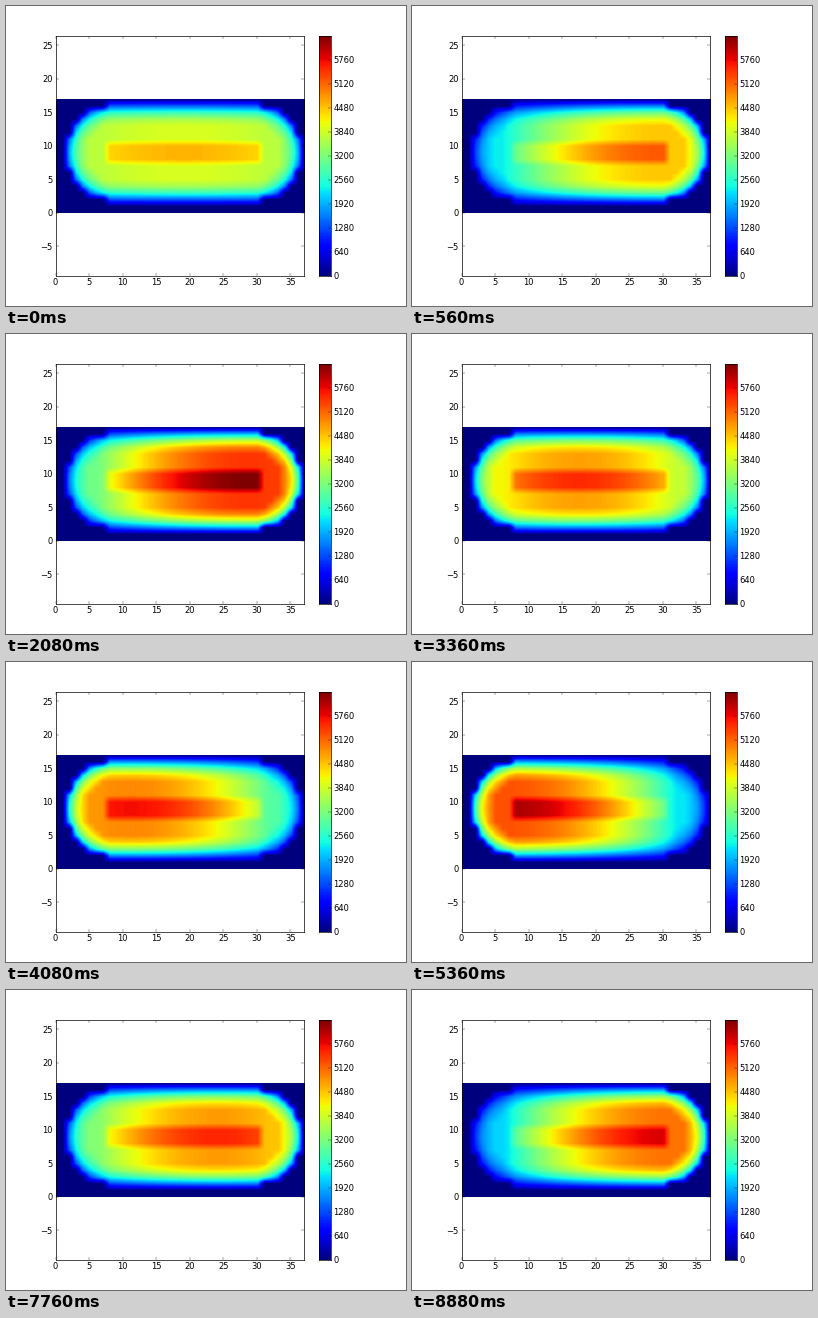
Write a matplotlib script that moves like this. It is 400 by 300 pixels and loops after 8.96 s.

```python
import numpy as np
import matplotlib.pyplot as plt
from matplotlib.animation import FuncAnimation
from matplotlib.patches import Rectangle

WIDTH, HEIGHT = 400, 300
STEP, FRAMES = 80, 112
COLS, ROWS, TOP = 37, 17, 6400
PERIOD, BALANCED = 8040, 3200   # swing length and a moment of no tilt, in ms

plt.rcParams.update({
    "font.family": "DejaVu Sans", "font.size": 12,
    "axes.linewidth": 1.0,
    "xtick.direction": "in", "ytick.direction": "in",
    "xtick.major.size": 4, "ytick.major.size": 4,
    "xtick.major.width": 0.5, "ytick.major.width": 0.5,
    "xtick.major.pad": 4, "ytick.major.pad": 4,
    "xtick.labelsize": 12, "ytick.labelsize": 12,
})

# Strength at the centre over time.
LEVEL_T = np.array([0, 1280, 2080, 3360, 5360, 6960, 8880])
LEVEL_V = np.array([4590, 5000, 5880, 5520, 5300, 5560, 5100])


def smooth(x, xp, fp):
    """Cubic Hermite curve through key points."""
    slope = np.gradient(fp, xp)
    i = np.clip(np.searchsorted(xp, x) - 1, 0, len(xp) - 2)
    h = xp[i + 1] - xp[i]
    u = (x - xp[i]) / h
    ease = u * u * (3 - 2 * u)
    return (fp[i] + (fp[i + 1] - fp[i]) * ease
            + h * u * (1 - u) * ((1 - u) * slope[i] - u * slope[i + 1]))


def core_shape():
    """Rounded bar: hot strip, plateau, then a stepped rim."""
    y, x = np.mgrid[0:ROWS + 1, 0:COLS + 1]
    middle = (x >= 8) & (x <= 30)
    dx = np.where(middle, 0, np.maximum(8.5 - x, x - 29.5))
    dy = np.abs(y - 9)
    shape = np.interp(np.hypot(dx, dy), [4.4, 4.5, 5, 6, 7, 7.1],
                      [.855, .78, .77, .58, .3, 0])
    shape[middle & (dy <= 1)] = 1
    return shape


SHAPE = core_shape()
ALONG = np.clip((np.arange(COLS + 1) - 19) / 11, -1.15, 1.15)


def field(i):
    t = i * STEP
    tilt = -1530 * (1 - np.exp(-t / 350)) * np.sin(2 * np.pi * (t - BALANCED) / PERIOD)
    bend = 680 - 460 * np.exp(-t / 400)
    profile = smooth(t, LEVEL_T, LEVEL_V) + tilt * ALONG - bend * ALONG**2
    return np.clip(SHAPE * profile, 0, TOP)


def add_axes(left, width):
    """Axes in stage pixels, nudged so that the frame snaps up and left."""
    return fig.add_axes([(left - 0.4) / WIDTH, 30.4 / HEIGHT,
                         width / WIDTH, 240 / HEIGHT])


fig = plt.figure(figsize=(WIDTH / 50, HEIGHT / 50), dpi=50, facecolor="white")
style = dict(cmap="jet", vmin=0, vmax=TOP, origin="lower", aspect="auto")

ax = add_axes(50, 248)
img = ax.imshow(field(0), interpolation="bilinear",
                extent=(-0.5, COLS + 0.5, -0.5, ROWS + 0.5), **style)
half = COLS * 240 / 248 / 2
ax.set_xlim(0, COLS)
ax.set_ylim(ROWS / 2 - half, ROWS / 2 + half)
ax.set_xticks(range(0, 36, 5))
ax.set_yticks(range(-5, 26, 5))
ax.tick_params(top=True, right=True)
img.set_clip_path(Rectangle((0, 0), COLS, ROWS, transform=ax.transData))

bar = add_axes(313.5, 12)
bar.imshow(np.linspace(0, TOP, 240)[:, None], interpolation="nearest",
           extent=(0, 1, 0, TOP), **style)
bar.set_xticks([])
bar.set_yticks(range(0, TOP, 640))
bar.yaxis.tick_right()
bar.tick_params(axis="y", pad=3)


def update(i):
    img.set_data(field(i))
    return [img]


anim = FuncAnimation(fig, update, frames=FRAMES, interval=STEP,
                     repeat=True, repeat_delay=0, blit=False)
plt.show()
```
